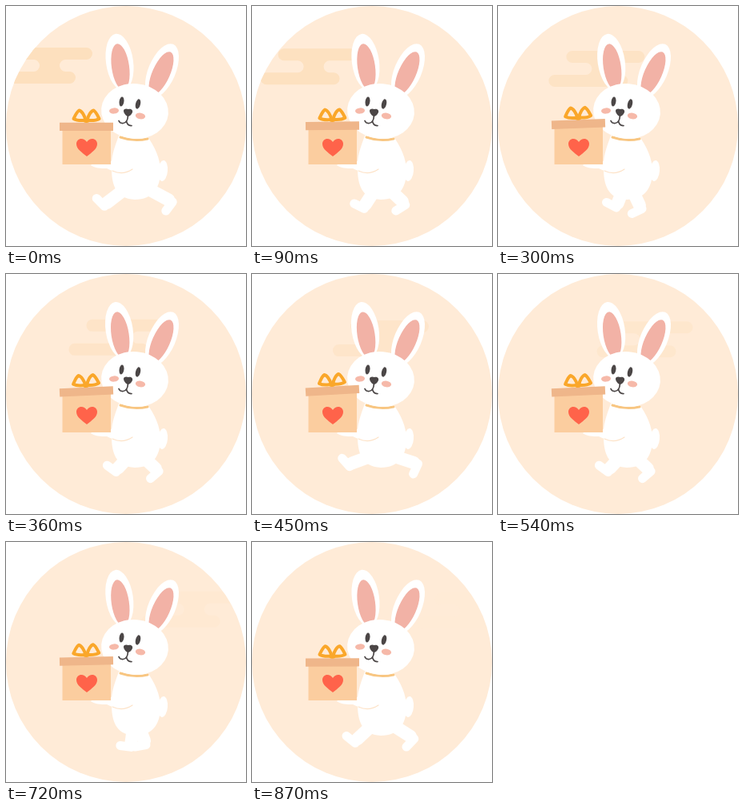
These frames come from a looping animation (300 by 300 pixels, 900 ms). An HTML page with a canvas:

```html
<!DOCTYPE html>
<html lang="en">
<head>
<meta charset="utf-8">
<title>Rabbit with a gift</title>
<style>
  html, body { margin: 0; width: 100%; height: 100%; overflow: hidden; background: #fff; }
  canvas { display: block; width: 300px; height: 300px; }
</style>
</head>
<body>
<canvas id="stage" width="300" height="300"></canvas>
<script>
const ctx = document.getElementById('stage').getContext('2d');
const LOOP = 900, STEP = 30;
const rad = deg => deg * Math.PI / 180;

// Foot poses over half a cycle: progress, x, y, angle
const LEG_A = [[0, 115, 250, 45], [.4, 150, 261, 8], [.667, 177, 261, -25], [1, 210, 245, -65]];
const LEG_B = [[0, 209, 253, -53], [.4, 170, 260, -10], [.667, 140, 254, 28], [1, 114, 240, 48]];

function ellipse(x, y, rx, ry, angle, color) {
  ctx.fillStyle = color;
  ctx.beginPath();
  ctx.ellipse(x, y, rx, ry, rad(angle), 0, 2 * Math.PI);
  ctx.fill();
}

function shape(d, color) {
  ctx.fillStyle = color;
  ctx.fill(new Path2D(d));
}

function line(d, color, width) {
  ctx.strokeStyle = color;
  ctx.lineWidth = width;
  ctx.stroke(new Path2D(d));
}

function place(x, y, angle, draw) {
  ctx.save();
  ctx.translate(x, y);
  ctx.rotate(rad(angle));
  draw();
  ctx.restore();
}

function poseAt(poses, u) {
  let i = 1;
  while (i < poses.length - 1 && u > poses[i][0]) i++;
  const a = poses[i - 1], b = poses[i];
  const k = (u - a[0]) / (b[0] - a[0]);
  return a.slice(1).map((v, n) => v + (b[n + 1] - v) * k);
}

function drawCloud(t) {
  ctx.save();
  ctx.globalAlpha = 1 - t / LOOP;
  ctx.translate(t * .251, t * .0135);
  shape('M17.5 52H100.5A7.5 7.5 0 0 1 100.5 67H74.5A7.5 7.5 0 0 0 74.5 82H79.5' +
        'A7.5 7.5 0 0 1 79.5 97H-4.5A7.5 7.5 0 0 1 -4.5 82H34.5' +
        'A7.5 7.5 0 0 0 34.5 67H17.5A7.5 7.5 0 0 1 17.5 52Z', '#fde0be');
  ctx.restore();
}

function drawLeg(poses, u) {
  const [x, y, angle] = poseAt(poses, u);
  const c = Math.cos(rad(angle)), s = Math.sin(rad(angle));
  const ankleX = x + 5 * c + 11 * s, ankleY = y + 5 * s - 11 * c;
  const hipX = 163 + (x - 163) * .25;
  line(`M${hipX} 227L${ankleX} ${ankleY}`, '#fff', 16);
  place(x, y, angle, () => line('M-8 -5.5L6 -5.5L5 -10', '#fff', 11));
}

function drawEars(u) {
  place(149, 104, -u * .8, () => {
    ellipse(-7, -34, 17, 35.5, -8, '#fff');
    ellipse(-6, -28, 11, 29, -8, '#f2b2a6');
  });
  ellipse(195, 81, 17, 36, 23, '#fff');
  ellipse(194, 84, 11, 29, 24, '#f2b2a6');
}

function drawBody() {
  ellipse(196, 206, 6, 13, 5, '#fff');
  shape('M141 162C136 176 131 188 132 203C132 221 136 241 161 242' +
        'C184 242 193 226 193 207C193 190 186 176 176 162Z', '#fff');
  line('M143 164Q160 170 177 166', '#f8c682', 3);
  shape('M106 199C110 195 120 198 130 194L150 192C161 194 160 206 150 208' +
        'C140 210 133 206 126 203C119 203 111 203 106 199Z', '#fff');
  line('M133 206Q146 212 158 204', '#fde3c8', 1.2);
}

function drawHead() {
  ellipse(161, 131.5, 42, 34.5, 5, '#fff');
  ellipse(144.5, 119.5, 2.9, 6, 8, '#4b4646');
  ellipse(165, 122.5, 3, 6.3, 14, '#4b4646');
  ellipse(135, 131, 6, 3.6, -5, '#f6b9a9');
  ellipse(168, 137.5, 6.2, 3.8, 10, '#f6b9a9');
  shape('M147 131C147 128 151 128 153 129C156 128 159 130 158 133C157 136 154 138 152 138' +
        'C150 137 147 134 147 131Z', '#4b4646');
  line('M152.5 137Q152 146 146.5 146.5Q142.5 147 141 143.5M150.5 144Q152 150 157 149.5',
       '#4b4646', 1.7);
}

function drawGift(u) {
  shape('M70.5 149H131V198H70.5Z', '#fbcd9f');
  shape('M101 188C95 183 88 179 88 172.5C88 165 97 163.5 101 170' +
        'C105 163.5 114 165 114 172.5C114 179 107 183 101 188Z', '#ff634a');
  place(100.5, 151 - 5 * u, -3.2 * u, () => {
    shape('M-33.5 -5.3H33.5V5H-33.5Z', '#efb68a');
    for (const side of [-1, 1]) {
      ctx.save();
      ctx.scale(side, 1);
      line('M1 -8C2 -14 6 -20 9 -20.5C12 -19 14 -14 16 -10C11 -7 6 -8 1 -8Z', '#faa72a', 4);
      ctx.restore();
    }
    ellipse(0, -8, 4.3, 3, 0, '#faa72a');
  });
}

function draw(now) {
  const t = Math.floor((now % LOOP) / STEP) * STEP;
  const u = 1 - Math.abs(2 * t / LOOP - 1);
  ctx.clearRect(0, 0, 300, 300);
  ctx.lineCap = ctx.lineJoin = 'round';
  ctx.save();
  ctx.beginPath();
  ctx.arc(150, 150, 150, 0, 2 * Math.PI);
  ctx.clip();
  ctx.fillStyle = '#ffebd7';
  ctx.fillRect(0, 0, 300, 300);
  drawCloud(t);
  drawLeg(LEG_B, u);
  drawLeg(LEG_A, u);
  drawEars(u);
  drawBody();
  drawHead();
  drawGift(u);
  ctx.restore();
}

const start = performance.now();
function tick() {
  draw(performance.now() - start);
  requestAnimationFrame(tick);
}
tick();
</script>
</body>
</html>
```
